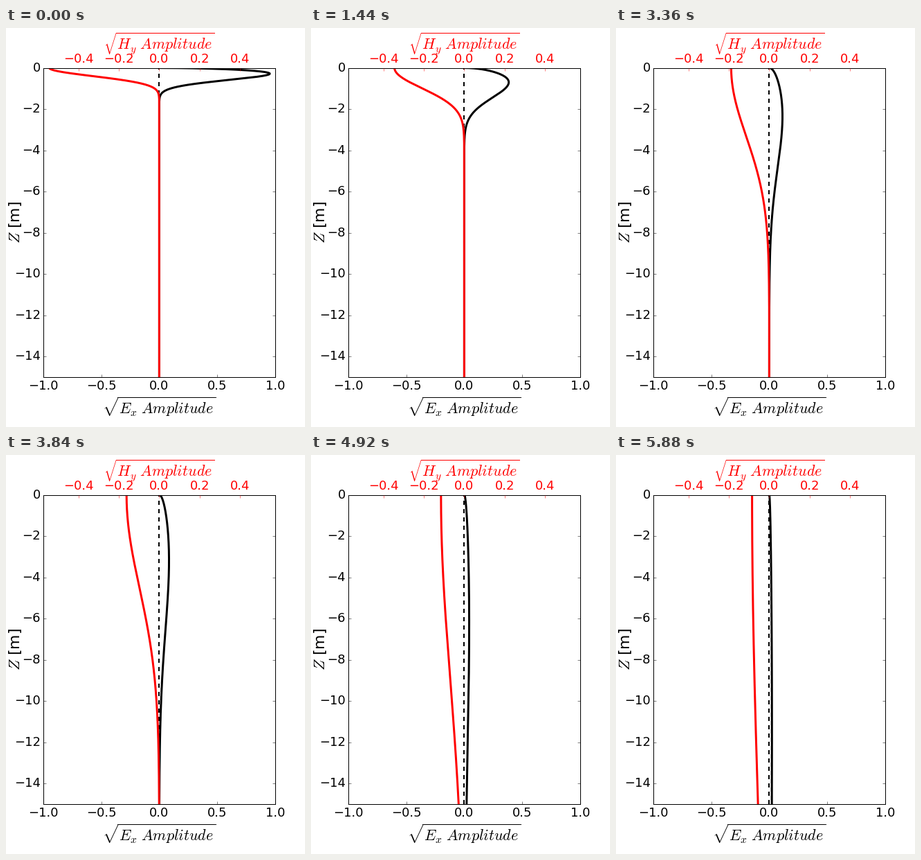
A matplotlib script that plays this animation: 432 by 576 pixels, repeating every 6000 ms.

```python
import numpy as np
import matplotlib.pyplot as plt
from matplotlib.animation import FuncAnimation

plt.style.use("classic")
plt.rcParams.update({
    "font.family": "DejaVu Sans",
    "mathtext.fontset": "cm",
    "font.size": 18,
    "axes.labelsize": 22,
    "xtick.labelsize": 18,
    "ytick.labelsize": 18,
    "savefig.dpi": "figure",
})

FRAMES, INTERVAL = 50, 120
DEPTH = 15
PEAK_DEPTH = 0.281   # depth of the strongest E field at the first step
E_PEAK = 0.954
H_SURFACE = 0.5455
GROWTH = np.exp(0.0758)   # the diffusion depth grows as the root of time

z = np.linspace(-DEPTH, 0, 3001)


def fields(step):
    """Square roots of the diffusing E and H amplitudes."""
    spread = GROWTH ** step
    u = -z / (PEAK_DEPTH * spread)
    decay = np.exp(-u ** 2 / 4)
    e_field = E_PEAK / spread * np.sqrt(u) * decay * np.exp(0.25)
    h_field = -H_SURFACE / np.sqrt(spread) * decay
    return e_field, h_field


fig = plt.figure(figsize=(6, 8), dpi=72, facecolor="white")
ax_e = fig.add_axes([0.125, 0.125, 0.775, 0.775])
ax_h = ax_e.twiny()

ax_e.plot([0, 0], [-DEPTH, 0], "k--", lw=2)
e_line, = ax_e.plot([], [], "k", lw=3)
h_line, = ax_h.plot([], [], "r", lw=3)

ax_e.set_xlim(-1, 1)
ax_e.set_ylim(-DEPTH, 0)
ax_e.set_xticks([-1, -0.5, 0, 0.5, 1])
ax_e.set_yticks(range(-14, 1, 2))
ax_e.set_xlabel(r"$\sqrt{E_x \; Amplitude}$")
ax_e.set_ylabel(r"$Z$ [m]", labelpad=-13)

ax_h.set_xlim(-0.575, 0.575)
ax_h.set_xticks([-0.4, -0.2, 0, 0.2, 0.4])
# The empty superscript sets the subscript a little lower.
ax_h.set_xlabel(r"$\sqrt{H^{}_y \; Amplitude}$", color="r")
ax_h.tick_params(axis="x", colors="r")


def update(step):
    e_field, h_field = fields(step)
    e_line.set_data(e_field, z)
    h_line.set_data(h_field, z)
    return e_line, h_line


anim = FuncAnimation(fig, update, frames=FRAMES, interval=INTERVAL,
                     repeat=True, repeat_delay=0)
plt.show()
```
